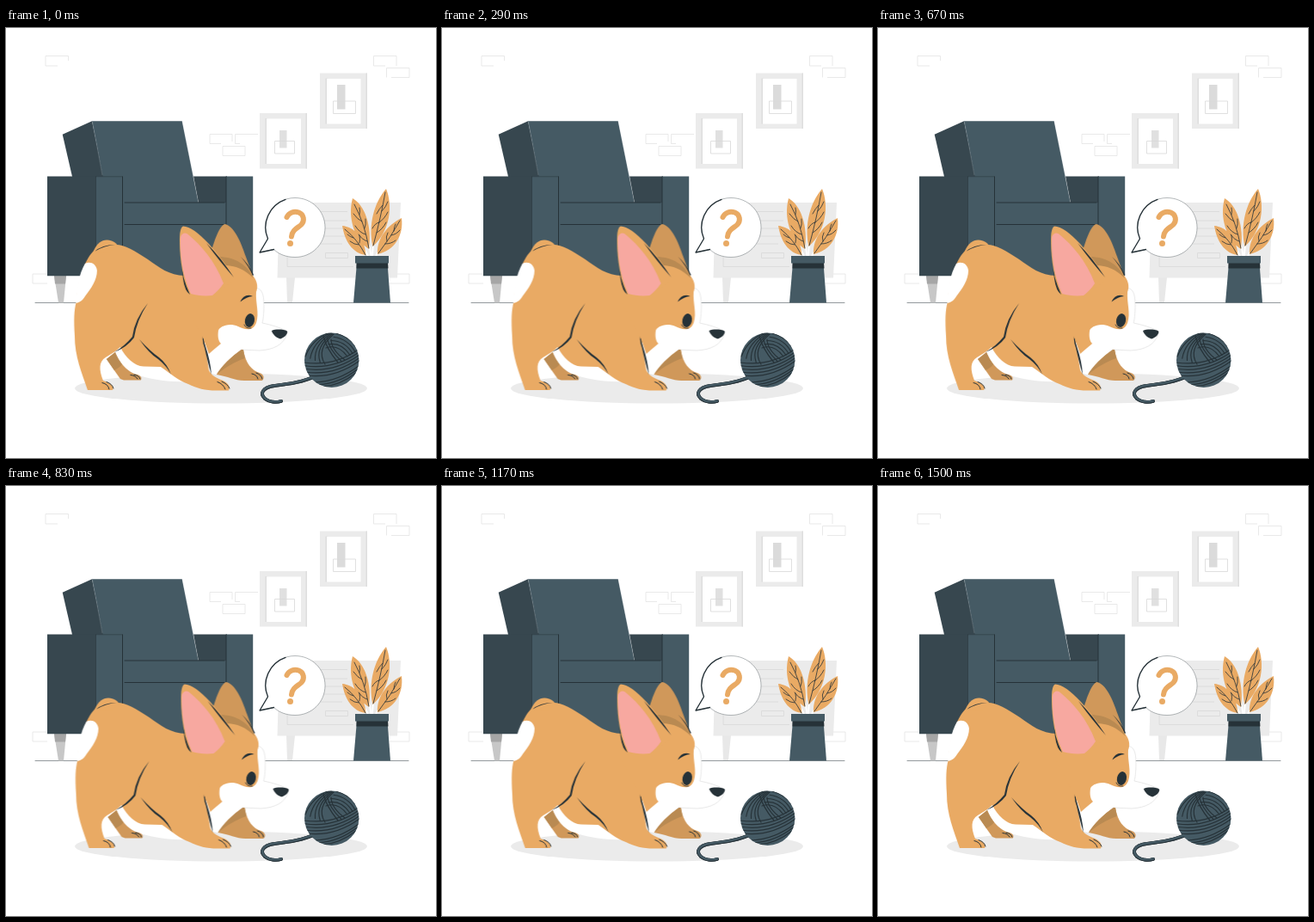
An HTML page for the animation above (1540 ms loop, 500 by 500 pixels).

```html
<!DOCTYPE html>
<html lang="en">
<head>
<meta charset="utf-8">
<title>Curious puppy</title>
<style>
  html, body { margin: 0; width: 100%; height: 100%; overflow: hidden; background: #fff; }
  svg { display: block; width: 100vw; height: 100vh; }
  .o { fill: #e9aa64; }
  .od { fill: #d0985a; }
  .os { fill: #b98a52; }
  .s { fill: #455a64; }
  .sd { fill: #37474f; }
  .k { fill: #263238; }
  .w { fill: #fff; }
  .g { fill: #ebebeb; }
  .line { fill: none; stroke: #263238; stroke-linecap: round; stroke-linejoin: round; }
  .thin { fill: none; stroke: #e4e4e4; stroke-width: .8; }
  .mid { stroke: #d8d8d8; }
  .hair { stroke-width: .5; }
  #dog { animation: shake 1540ms linear infinite; }
  /* 1.5 s shake, sampled with a 21 ms lead */
  @keyframes shake {
    0% { transform: translateX(-.14px); }
    8.38%, 86.3% { transform: translateX(-1px); }
    18.12%, 76.56% { transform: translateX(2px); }
    27.86%, 47.34%, 66.82% { transform: translateX(-4px); }
    37.6%, 57.08% { transform: translateX(4px); }
    96.04% { transform: translateX(0); }
    100% { transform: translateX(-.2px); }
  }
</style>
</head>
<body>
<svg viewBox="0 0 500 500">
  <defs>
    <clipPath id="ball"><circle cx="378.7" cy="386.3" r="31.7"/></clipPath>
  </defs>

  <!-- wall -->
  <path class="thin" d="M60 44H46V32.500H72.500V38M441 44H427.500V32.500H454V44M442.500 57.500V46.500H469V57.500H448M250 134.500H237V123.500H263V132M272 134.500H266.500V123.500H293M252 137.500H278V148.500H252ZM48 297H31V286H48M446 286H469V297H446"/>
  <path class="g" d="M295 99H350V163.500H295Z"/>
  <path fill="#dedede" d="M301.500 105H303.500V158H301.500ZM348.500 99H350V163.500H348.500Z"/>
  <path class="w" d="M303 105.500H343V158H303Z"/>
  <path fill="#e0e0e0" d="M318 119H326.500V139.500H318Z"/>
  <path class="thin mid" d="M312.500 131.500H335.500V146H312.500Z"/>
  <path class="g" d="M365 52.500H420V117H365Z"/>
  <path fill="#dedede" d="M371.500 58.500H373.500V111.500H371.500ZM418.500 52.500H420V117H418.500Z"/>
  <path class="w" d="M373 59H412.500V111.500H373Z"/>
  <path fill="#dbdbdb" d="M385 66H394.500V94.500H385Z"/>
  <path class="thin mid" d="M380.500 85H406.500V99.500H380.500Z"/>

  <!-- cabinet -->
  <path fill="#e8e8e8" d="M326 290H336L333 319H327Z"/>
  <path class="g" d="M318 203H459L455 290.500H315.500Z"/>
  <path class="thin mid" d="M327 266V277.500H404M366 213.500H397M366 224H397M366 233H393M366 242H395M366 251H391M371.500 261.500H397.500V267.500H371.500Z"/>

  <path class="line hair" d="M34 319.500H468"/>

  <!-- armchair -->
  <path fill="#c7c7c7" d="M56 288H70L67 319.500H61Z"/>
  <path fill="#a6a6a6" d="M56 288H70L69 297.500H57Z"/>
  <path class="sd" d="M65.700 123.700L100 108.300L114 175H77.500Z"/>
  <path class="s" d="M100 108.300H204.700L224 204H119Z"/>
  <path class="sd" d="M218 172.500H257V204H224ZM48 172.500H105V288.300H48Z"/>
  <path class="s" d="M104.500 172.500H136V203H256V172.500H287.200V288.300H104.500Z"/>
  <path class="line" d="M135.500 173V288M138 203H254M138 228.500H254M256 173V288"/>
  <path class="line hair" d="M104.500 173V288M104.500 172.800H135.500"/>
  <path fill="none" stroke="#cfd8dc" stroke-opacity=".5" stroke-width=".4" d="M100.500 109L112 171M205 109L223.500 202"/>

  <!-- speech bubble -->
  <path class="w" stroke="#263238" stroke-width=".35" d="M295 261L304.500 245C294 224 311 197.500 336 197.500C356 197.500 371 213 371 232C371 251 356 266.500 336 266.500C326 266.500 317 263 311.500 257.500Z"/>
  <path class="line" stroke-width="1.3" d="M325 199.300C306 206 297 227 304.500 245L295 261L311.500 257.500"/>
  <path fill="none" stroke="#e9aa64" stroke-width="6" stroke-linecap="round" stroke-linejoin="round" d="M326.500 220C329 214.500 335 212.500 340.500 214.500C346.500 217 347.500 224 343.500 228.500C339.500 232.500 333 234 332 242.500"/>
  <circle class="o" cx="330.500" cy="250.500" r="3.500"/>

  <!-- plant -->
  <path fill="none" stroke="#fff" stroke-width="2" d="M416 258Q420 261 421 266M421 248Q424 258 424.500 266M428 246Q426 258 426 266M437 257Q431 261 430 266"/>
  <path class="o" d="M391 230C404 231 417 243 418.500 264C403 262 394 248 391 230ZM403 198C417 206 426 230 422 257C405 246 397 220 403 198ZM442 187C450 206 447 236 426.500 254C421 229 428 203 442 187ZM460 221C462.500 241 452 259 432 263C431 244 444 229 460 221Z"/>
  <path class="line" stroke-width=".8" d="M394 234Q409 246 418 264M404 244Q400 243 397 240M410 252Q405 252 400 248M411 250Q412 246 411 241M405 205Q417 227 422 256M411 217Q412 213 411 209M414 225Q409 223 404 216M417 233Q419 228 418 222M418 240Q411 238 406 230M420 248Q414 246 410 240M441 191Q436 220 427 253M438 206Q434 210 431 216M437 213Q442 208 444 202M434 226Q429 227 426 233M434 226Q440 222 444 214M431 238Q438 234 442 226M458 224Q447 244 433 262M451 236Q451 231 453 228M448 241Q454 240 458 235M443 248Q441 243 444 238M441 251Q448 251 453 247"/>
  <path class="s" d="M408 273H443.500L447 319.500H404Z"/>
  <path class="k" d="M407.500 273H444L444.500 279.500H407.500Z"/>
  <path class="s" d="M406 265H445V273.500H406Z"/>

  <ellipse class="g" cx="250" cy="419" rx="170" ry="17.500"/>

  <!-- yarn -->
  <g fill="none" stroke-linecap="round">
    <path id="tail" stroke="#263238" stroke-width="3.800" d="M362 404C345 412 328 414 312 416C298 418 295 425 301 431C306 435 314 435.500 320 434"/>
    <use href="#tail" stroke="none"/>
    <path stroke="#455a64" stroke-width="2.600" d="M362 403.600C345 411.600 328 413.600 312 415.600C298 417.600 295 424.600 301 430.600C306 434.600 314 435 320 433.600"/>
  </g>
  <circle class="s" cx="378.700" cy="386.300" r="31.700"/>
  <g id="yarn" class="line" clip-path="url(#ball)" stroke-width="1.2"></g>

  <g id="dog">
    <!-- far hind leg and belly -->
    <path class="w" d="M130 374L140 403L158 405C172 409 194 412 208 411L184 392Z"/>
    <path class="od" d="M127 377L117 385C123 394 129 402 133 408L137 409.500H157C159 405 155 403 149 402C140 398 132 389 127 377Z"/>
    <path class="os" d="M127 377L117 385L126 398C131 395 134 393 135 391C132 387 129 382 127 377Z"/>
    <path class="line" d="M145 403.500Q151 404 153 408M149 403Q155 404 156 408"/>

    <!-- chest, muzzle and far front leg -->
    <path class="w" stroke="#d9d9d9" stroke-width=".6" d="M290 302C297 303 300 308 300 322C300 333 299 340 298 343C308 345 318 348 326 352L326 358C322 368 312 374 295 375L273 374C262 385 250 398 245 404L238 402L229 360C240 340 262 325 290 302Z"/>
    <path class="od" d="M274 374C263 381 250 394 245 403C258 405 266 410 277 410H298C301 407 300 403 295 401C286 398 279 391 276 374Z"/>
    <path class="os" d="M274 374C263 381 250 394 245 403C256 394 266 388 278 384Q277 379 276 374Z"/>
    <path class="line" d="M286 402Q292 403 293 408M291 401Q297 403 298 408"/>

    <!-- body -->
    <path class="o" d="M104 257C92 268 84 290 82 318C79 328 79 340 80 358C80 382 88 400 95 421H124C127 417 121 412 113 410C108 397 108 388 116 383C122 379 128 376 133 371C139 383 149 393 160 393.500L180 394C192 402 200 410 212 414C222 419 232 421.500 244 421.500H259C262 417 257 411 250 409C242 406 238 402 236 398L231 366L262 330L240 295L208 288C190 288 178 278 165 269C150 259 138 252 128 252Z"/>
    <path class="o" d="M102 259C106 250 112 246 118 246.500C124 247 127 249 130 253L120 262Z"/>
    <path class="k" d="M103 260Q113 253.500 127 252Q112 252 103 260Z"/>
    <path class="w" d="M92 274C98 271 105 274 106 282C106 293 99 303 92 312C89 317 86 319 81.500 320C82 303 85 286 92 274Z"/>
    <path class="k" d="M165 320Q150 338 147 359Q138 370 126 377Q141 371 149 360Q152 340 165 320ZM155 362Q167 379 177 385Q187 393 192 403Q188 391 178 383Q169 377 155 362ZM230 353Q227 362 231 372Q235 390 239 403Q238 388 232 370Q229 362 230 353Z"/>
    <path class="line" d="M112 412.500Q119 414 120 420M117 411.500Q124 414 125 419M246 411.500Q253 414 255 420M251 411Q258 414 260 419"/>

    <!-- far ear -->
    <path class="od" d="M238 263C242 248 248 230 254.500 228C265 230 273 248 279 266L290 296L262 300Z"/>
    <!-- head -->
    <path class="o" d="M212 300L249 266C267 268 281 278 288 289C293 296 293 302 291 307C290 320 295 331 291 343C287 353 278 351 270 347C258 342 248 348 247 352C246 359 247 364 250 367C244 372 240 375 236 379L230 362L208 320Z"/>
    <path class="os" d="M247 266C267 266 281 276 288 291C278 281 267 276 254 276Z"/>
    <path class="k" d="M273 266Q282 276 287 288L288 287Q282 274 273 266Z"/>
    <!-- near ear -->
    <path class="o" d="M206 230.500C214 231 224 238 236 251C248 264 258 278 267 292L250 305L214 309C206 294 202 270 202 247C202 238 203 232 206 230.500Z"/>
    <path fill="#f7a8a0" d="M203 243C205 238 209 237 213 241C226 252 243 270 253 297C249 303 245 307 240 311C231 312 222 311 215 309C206 291 202 264 203 243Z"/>
    <path class="k" d="M233 250Q250 267 265 290Q249 272 233 250ZM203 270Q205 291 214 310Q208 306 206 292Z"/>

    <!-- face -->
    <path class="k" d="M272.500 318.500C275 312 281 309 287 312C282 312 277 315 272.500 318.500Z"/>
    <ellipse class="k" cx="283.500" cy="340" rx="5.500" ry="8" transform="rotate(12 283.500 340)"/>
    <path class="line" stroke-width=".8" d="M277 345Q279 350 285 349"/>
    <path class="k" d="M309 352C313 350 323 350 327 352.500C328.500 355 324 360 319 361.500C314 360 310 356 309 352Z"/>
  </g>
</svg>
<script>
  // Strands: n curves blended between two quadratics.
  const yarn = document.getElementById('yarn');
  function strands(a, b, n) {
    for (let i = 0; i < n; i++) {
      const p = a.map((v, j) => v + (b[j] - v) * i / (n - 1));
      const el = document.createElementNS('http://www.w3.org/2000/svg', 'path');
      el.setAttribute('d', `M${p[0]} ${p[1]}Q${p.slice(2).join(' ')}`);
      yarn.append(el);
    }
  }
  strands([347, 389, 382, 394, 411, 373], [350, 404, 382, 408, 411, 387], 5);
  strands([348, 382, 356, 362, 376, 354], [371, 391, 360, 374, 381, 356], 5);
  strands([384, 355, 402, 360, 409, 375], [372, 372, 386, 367, 397, 382], 5);
  strands([369, 358, 372, 372, 386, 389], [378, 362, 378, 374, 394, 386], 3);
  strands([360, 412, 386, 411, 410, 393], [368, 417, 388, 416, 407, 401], 3);
</script>
</body>
</html>
```
